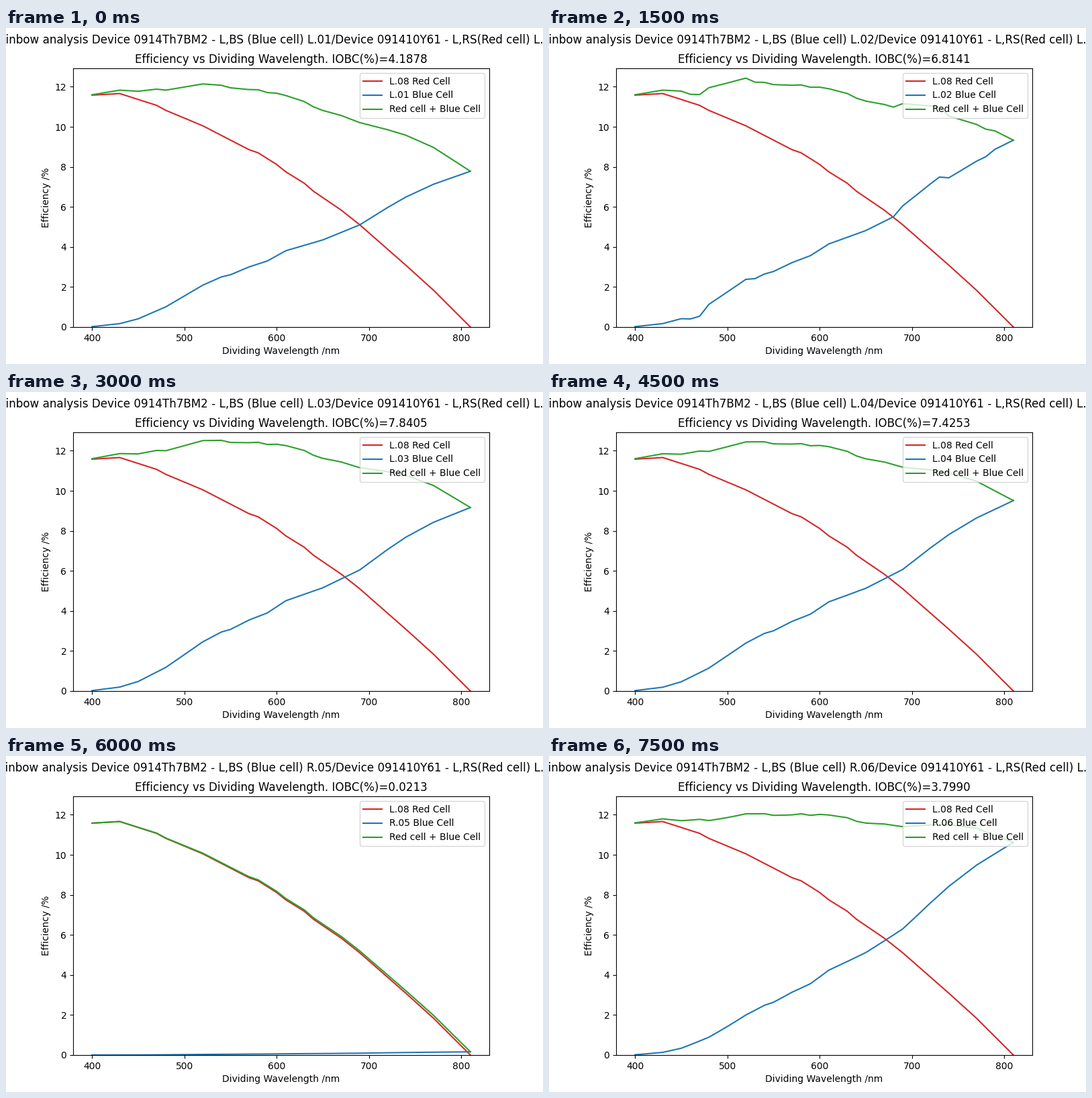
A matplotlib script that plays this animation: 800 px wide and 500 px high, repeating every 8000 ms.

```python
import numpy as np
import matplotlib.pyplot as plt
from matplotlib.animation import FuncAnimation

STEP_MS = 500
HOLD = 3      # steps each cell stays on screen
STEPS = 16
HEADING_PT = 12.03

nm = np.arange(400, 811, 10)
u = (nm - 600) / 100


def curve(points):
    """Straight runs through a few (wavelength: efficiency) points."""
    return np.interp(nm, list(points), list(points.values()))


def band(low, high, height):
    return np.where((nm >= low) & (nm <= high), height, 0)


red = curve({
    400: 11.58, 430: 11.66, 470: 11.07, 480: 10.82, 520: 10.05, 570: 8.86,
    580: 8.70, 600: 8.12, 610: 7.75, 630: 7.18, 640: 6.78, 670: 5.84,
    690: 5.11, 740: 3.09, 770: 1.84, 810: 0})

base = curve({
    400: 0.02, 430: 0.17, 450: 0.41, 480: 1.01, 520: 2.09, 540: 2.50,
    550: 2.61, 570: 3.00, 590: 3.30, 610: 3.81, 650: 4.35, 690: 5.10,
    720: 5.96, 740: 6.49, 770: 7.13, 810: 7.78})

steps = (band(460, 470, -0.36) + band(480, 520, 0.09)
         + band(690, 730, 0.06) + band(790, 810, 0.02))

# Each blue cell is the base curve times a smooth ratio.
cells = [
    ("L.01", "4.1878", base),
    ("L.02", "6.8141", base * (1.085 + 0.045 * u + steps)),
    ("L.03", "7.8405", base * (1.183 + 0.006 * u - 0.004 * u**2)),
    ("L.04", "7.4253", base * (1.166 + 0.027 * u)),
    ("R.05", "0.0213", base * (0.0165 + 0.002 * u)),
    ("R.06", "3.7990",
     base * (1.096 + 0.1675 * u - 0.0125 * u**2 - 0.003 * u**3)),
]

fig, ax = plt.subplots(figsize=(8, 5), dpi=100)
fig.subplots_adjust(left=0.125, right=0.9, bottom=0.11, top=0.88)

ax.plot(nm, red, color="tab:red", label="L.08 Red Cell")
blue_line, = ax.plot(nm, base, color="tab:blue", label="L.01 Blue Cell")
sum_line, = ax.plot(nm, red + base, color="tab:green",
                    label="Red cell + Blue Cell")
ax.set_xlim(379.5, 830.5)
ax.set_ylim(0, 12.92)
ax.set_xlabel("Dividing Wavelength /nm")
ax.set_ylabel("Efficiency /%")
blue_label = ax.legend(loc="upper right").get_texts()[1]
heading = fig.suptitle("", y=0.982, fontsize=HEADING_PT)
title = ax.set_title("", fontsize=HEADING_PT)


def draw(step):
    name, gain, blue = cells[step // HOLD]
    blue_line.set_ydata(blue)
    sum_line.set_ydata(red + blue)
    blue_label.set_text(f"{name} Blue Cell")
    title.set_text(f"Efficiency vs Dividing Wavelength. IOBC(%)={gain}")
    heading.set_text(f"Rainbow analysis Device 0914Th7BM2 - L,BS (Blue cell) "
                     f"{name}/Device 091410Y61 - L,RS(Red cell) L.08")
    return blue_line, sum_line, blue_label, title, heading


anim = FuncAnimation(fig, draw, frames=STEPS, interval=STEP_MS,
                     init_func=lambda: draw(0), repeat=True)
plt.show()
```
